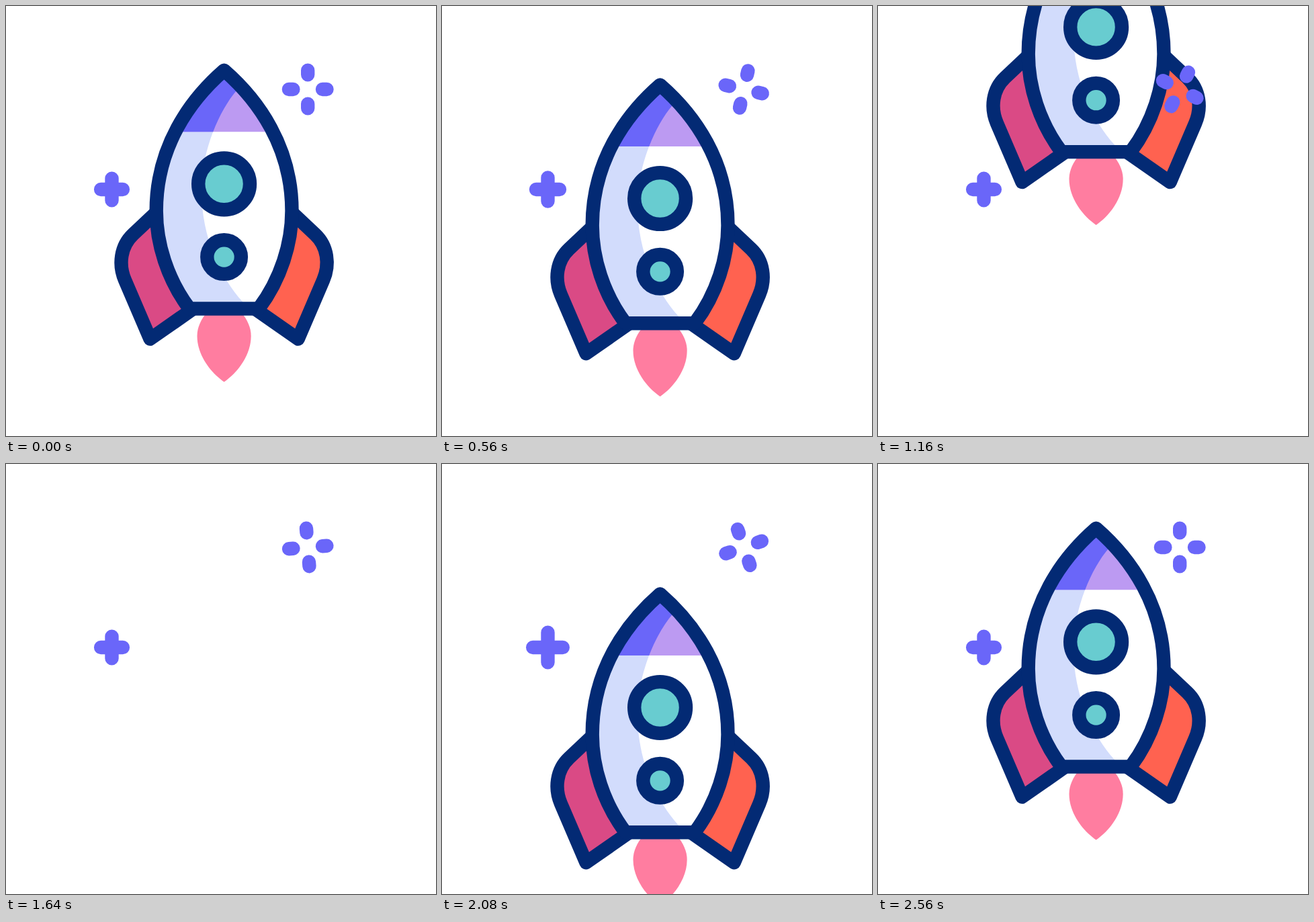
An HTML page that plays this animation: 640 px wide and 640 px high, repeating every 2.76 s.

```html
<!DOCTYPE html>
<html lang="en">
<head>
<meta charset="utf-8">
<title>Rocket</title>
<style>
  html, body { margin: 0; width: 100%; height: 100%; overflow: hidden; background: #fff; }
  svg { display: block; width: 100%; height: 100%; }
  .line { stroke: #032a74; stroke-width: 20.4; stroke-linejoin: round; }
  .star { fill: none; stroke: #6a66f9; stroke-width: 20.4; stroke-linecap: round; }
</style>
</head>
<body>
<svg viewBox="0 0 640 640">
  <defs>
    <path id="hull" d="M324.6 95.8C273.3 140.4 223.7 210 223.7 305C223.7 353 240 406.5 273.1 450.5H376.1C409.2 406.5 425.5 353 425.5 305C425.5 210 375.9 140.4 324.6 95.8Z"/>
    <path id="shade" d="M343 126C318 155 291 215 291 275C291 345 320 405 352 440L362 460H200V90H343Z"/>
    <path id="fin" class="line" d="M224 307L189 340C170.5 357.5 167 384.7 177 408L214.5 495.5L279 450.5Z"/>
    <clipPath id="inHull"><use href="#hull"/></clipPath>
    <clipPath id="inNose"><rect x="200" y="80" width="250" height="107.3"/></clipPath>
  </defs>
  <g id="rocket">
    <path fill="#ff7da0" d="M300 455C290 466 284.5 479 284.5 491C284.5 520 305 546 324.6 559.5C344.2 546 364.7 520 364.7 491C364.7 479 359.2 466 349.2 455Z"/>
    <use href="#fin" fill="#da4a85"/>
    <use href="#fin" fill="#ff6250" transform="matrix(-1 0 0 1 649.2 0)"/>
    <g clip-path="url(#inHull)">
      <use href="#hull" fill="#fff"/>
      <use href="#shade" fill="#d2dcfc"/>
      <g clip-path="url(#inNose)">
        <use href="#hull" fill="#bc9af2"/>
        <use href="#shade" fill="#6a66f9"/>
      </g>
    </g>
    <use href="#hull" class="line" fill="none"/>
    <g class="line" fill="#68ccd0">
      <circle cx="324.6" cy="264.8" r="38.4"/>
      <circle cx="324.6" cy="373.6" r="25.3"/>
    </g>
  </g>
  <path id="plus" class="star"/>
  <g transform="translate(449.2 124)">
    <path id="spark" class="star" d="M0 -21.8V-28.3M0 21.8V28.3M-21.8 0H-28.3M21.8 0H28.3"/>
  </g>
</svg>
<script>
  const LOOP = 2760, STEP = 40, REST = 2560, SPIN = 2720;
  const [rocket, plus, spark] = ['rocket', 'plus', 'spark'].map(id => document.getElementById(id));

  const smooth = u => {
    u = Math.min(1, Math.max(0, u));
    return u * u * (3 - 2 * u);
  };

  // Dip, launch off the top, then arrive from below.
  function rocketY(t) {
    if (t < 600) return 22 * smooth(t / 600);
    if (t < 1600) return 22 - 70.5 * ((t - 600) / 280) ** 1.857;
    return 97.7 * (Math.max(0, 2480 - t) / 400) ** 2.5;
  }

  const pulse = (t, peak) => smooth(1 - Math.abs(t - peak) / 320);

  // One full turn, slow at both ends.
  function turn(t) {
    const u = t / SPIN, v = 1 - Math.abs(2 * u - 1);
    const half = 0.5 * v ** 3 * (1 + 0.6 * v ** 4 * (1 - v));
    return 360 * (u < 0.5 ? half : 1 - half);
  }

  function draw(t) {
    const arm = 16.4 + 7 * (pulse(t, 800) + pulse(t, 2160));
    rocket.setAttribute('transform', `translate(0 ${rocketY(t).toFixed(2)})`);
    plus.setAttribute('d', `M${157.5 - arm} 273h${2 * arm}M157.5 ${273 - arm}v${2 * arm}`);
    spark.setAttribute('transform', `rotate(${turn(t).toFixed(2)})`);
  }

  const start = performance.now();
  function frame() {
    const t = Math.floor((performance.now() - start) % LOOP / STEP) * STEP;
    draw(t < REST ? t : 0);
    requestAnimationFrame(frame);
  }
  frame();
</script>
</body>
</html>
```
